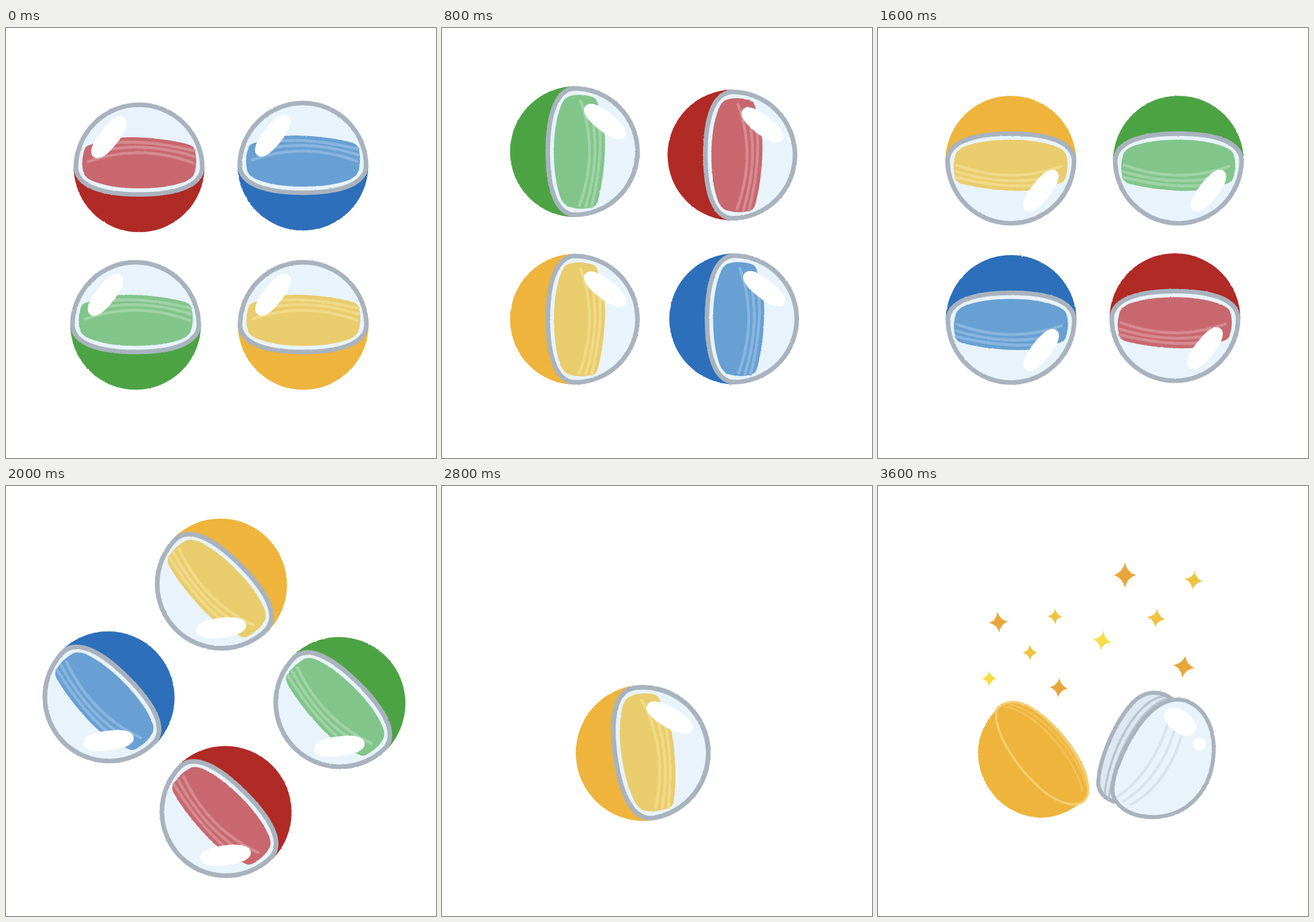
An HTML page with a canvas for the animation above (4 s loop, 748 by 748 pixels).

```html
<!DOCTYPE html>
<html lang="en">
<head>
<meta charset="utf-8">
<title>Capsules</title>
<style>
html, body { margin: 0; width: 100%; height: 100%; overflow: hidden; background: #fff; }
canvas { display: block; width: 100%; height: 100%; filter: url(#rough); }
svg { position: absolute; width: 0; height: 0; }
</style>
</head>
<body>
<svg aria-hidden="true">
  <filter id="rough" x="0" y="0" width="100%" height="100%" color-interpolation-filters="sRGB">
    <feTurbulence type="fractalNoise" baseFrequency="0.3" numOctaves="2" seed="4"/>
    <feColorMatrix values="1 0 0 0 0  0 1 0 0 0  0 0 1 0 0  0 0 0 0 1" result="noise"/>
    <feDisplacementMap in="SourceGraphic" in2="noise" scale="2.2" xChannelSelector="R" yChannelSelector="G"/>
  </filter>
</svg>
<canvas width="748" height="748"></canvas>
<script>
const ctx = document.querySelector('canvas').getContext('2d');
const STEP = 400, STEPS = 10;
const GREY = '#a9b3be', GLASS = '#e8f3fc';

// position in the starting pose, shell, content and thread colours
const balls = [
  { x: 231.5, y: 241.5, shell: '#b02a26', inner: '#c8686e', thread: '#d58a90' },
  { x: 516.5, y: 238.5, shell: '#2d6fba', inner: '#68a0d3', thread: '#88b5de' },
  { x: 225.5, y: 515.5, shell: '#4ca344', inner: '#82c58a', thread: '#9fd3a5' },
  { x: 517, y: 515.5, shell: '#eeb43c', inner: '#e9cc6c', thread: '#f0da88' }
];

const dome = new Path2D('M-110 2A110 110 0 0 1 110 2C107.5 33 66 48 0 48S-107.5 33-110 2Z');
const content = new Path2D('M-96-27Q-94-36-86-38L-74-42Q-46-52-10-51.5Q45-50 86-39Q96-36 97.5-27' +
  'Q102-8 96 12Q93 20 80 26Q48 37.5 0 37.5T-80 25Q-93 20-96 12Q-102-5-96-27Z');
const threads = new Path2D('M-88-9Q0-41 94-7M-80-24Q0-47 96-18M-62-39Q0-51 96-28');

const cup = new Path2D('M205 390C213 377 232 373 249 377C292 386 365 472 367 522C368 539 359 550 349 554' +
  'C325 571 303 577 283 577C222 575 174 524 174 463C175 433 187 410 205 390Z');
const cupEdge = new Path2D('M206 390C200 428 243 493 287 530C316 554 350 562 362 543' +
  'C375 521 350 470 318 432C286 393 253 374 231 376Q213 378 206 390');
const cupThreads = new Path2D('M219 384C268 388 338 462 356 531M229 380C279 388 345 462 362 520');

const neck = new Path2D('M512 371C490 354 464 356 444 376C412 410 385 474 383 517Q384 539 410 549L460 470Z');
const neckThreads = new Path2D('M497 366C450 370 400 464 394 540M506 369C459 380 410 465 402 542');
const lid = new Path2D('M411 543C399 520 426 455 455 415C481 380 510 365 537 374' +
  'C569 387 585 421 584 461C582 530 537 575 480 576C447 576 422 565 411 543Z');
const lidThreads = new Path2D('M505 410C490 465 455 515 416 541M517 420C502 476 468 525 427 548M529 430C515 485 480 533 440 554');

// x, y, half width, half height, tilt, colour index
const starTones = ['#e8a63a', '#f0c441', '#f7dc45'];
const stars = [
  [429.5, 155, 20, 22, 0, 0], [549, 164, 16, 16, .14, 1], [484, 230, 16, 16, .14, 1],
  [308, 227, 12.5, 13.5, 0, 1], [209.5, 237, 16.5, 18, -.08, 0], [264.5, 290, 13, 13.5, 0, 1],
  [390, 269, 16, 16.5, .17, 2], [193.5, 335, 13, 13.5, 0, 2], [314.5, 351, 16, 16.5, .08, 0],
  [532, 314, 19.5, 19, .14, 0]
];

function fill(path, color) {
  ctx.fillStyle = color;
  ctx.fill(path);
}

function line(path, color, width) {
  ctx.strokeStyle = color;
  ctx.lineWidth = width;
  ctx.stroke(path);
}

function at(x, y, angle, scale, draw) {
  ctx.save();
  ctx.translate(x, y);
  ctx.rotate(angle);
  ctx.scale(scale, scale);
  draw();
  ctx.restore();
}

// slightly squared ellipse
function gloss(x, y, rx, ry, angle) {
  at(x, y, angle, 1, () => {
    const path = new Path2D(), bend = v => Math.sign(v) * Math.abs(v) ** .86;
    for (let i = 0; i < 60; i++) {
      const a = i * Math.PI / 30;
      path.lineTo(rx * bend(Math.cos(a)), ry * bend(Math.sin(a)));
    }
    fill(path, '#fff');
  });
}

function capsule(ball, x, y, angle, scale) {
  at(x, y, angle, scale, () => {
    const disc = new Path2D();
    disc.arc(0, 0, 113.8, 0, Math.PI * 2);
    // the shell only shows below the rim
    ctx.save();
    ctx.beginPath();
    ctx.rect(-120, 2, 240, 120);
    ctx.clip();
    fill(disc, ball.shell);
    ctx.restore();
    fill(dome, GLASS);
    fill(content, ball.inner);
    line(threads, ball.thread, 5);
    line(dome, GREY, 8);
    gloss(-52.3, -51.5, 43.5, 17, -.91);
  });
}

function ring(step) {
  const turn = step * Math.PI / 4, c = Math.cos(turn), s = Math.sin(turn);
  const px = 374, py = 373.6, lift = step === 2 ? -10 : 0;
  for (const ball of balls) {
    const dx = ball.x - px, dy = ball.y - py;
    capsule(ball, px + dx * c - dy * s, py + dx * s + dy * c + lift, turn, step % 2 ? 1.015 : 1);
  }
}

function sparkle(x, y, w, h, tilt, tone) {
  const k = .2;
  at(x, y, tilt, 1, () => {
    const path = new Path2D();
    path.moveTo(0, -h);
    for (const [sx, sy, ex, ey] of [[1, -1, w, 0], [1, 1, 0, h], [-1, 1, -w, 0], [-1, -1, 0, -h]]) {
      path.quadraticCurveTo(sx * w * k, sy * h * k, ex, ey);
    }
    fill(path, starTones[tone]);
  });
}

function opened(done) {
  at(done ? 0 : 5, 0, 0, 1, () => {
    fill(cup, '#eeb43c');
    line(cupThreads, '#f2c256', 3);
    line(cupEdge, '#f6cd70', 4);
  });
  at(done ? 0 : -9, 0, 0, 1, () => {
    fill(neck, '#dde7f0');
    line(neckThreads, '#b9c4cf', 4);
    line(neck, GREY, 7);
    fill(lid, '#e8f3fa');
    line(lidThreads, '#d9e4ed', 5);
    line(lid, GREY, 7);
    gloss(526, 410, 31, 19, .65);
    gloss(559.5, 449, 11, 11, 0);
  });
  for (const [x, y, ...rest] of stars) {
    if (done) sparkle(x, y, ...rest);
    else sparkle((x - 373) * 1.1 + 366.5, (y - 155) * .95 + 184, ...rest);
  }
}

let shown = -1;
function tick(now) {
  const step = Math.floor(now / STEP) % STEPS;
  if (step !== shown) {
    shown = step;
    ctx.clearRect(0, 0, 748, 748);
    ctx.lineCap = ctx.lineJoin = 'round';
    if (step < 7) ring(step);
    else if (step === 7) capsule(balls[3], 351, 464.3, 82 * Math.PI / 180, 1.04);
    else opened(step === 9);
  }
  requestAnimationFrame(tick);
}
tick(0);
</script>
</body>
</html>
```
